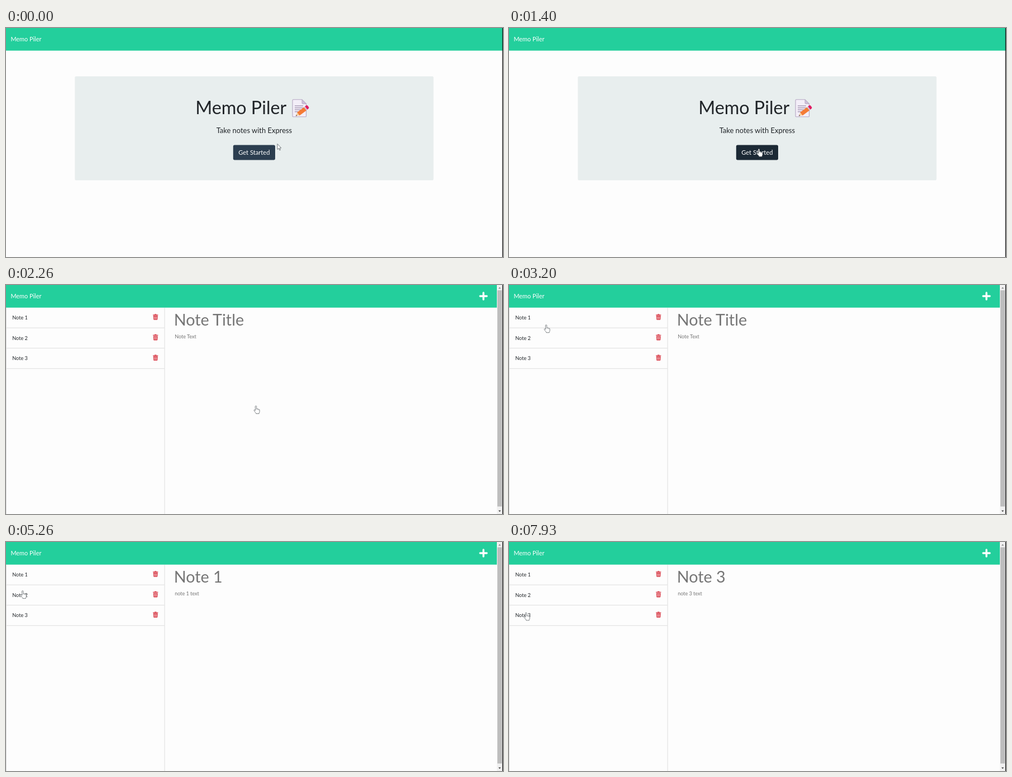
An HTML page that plays this animation: 890x412 px, repeating every 8 s.

```html
<!DOCTYPE html>
<html lang="en">
<head>
<meta charset="utf-8">
<title>Memo Piler</title>
<style>
  html, body { margin: 0; width: 100%; height: 100%; overflow: hidden; background: #fdfdfd; }
  svg { display: block; width: 100vw; height: 100vh; }
  text { font-family: Lato, sans-serif; }
</style>
</head>
<body>
<svg viewBox="0 0 890 412">
  <defs>
    <g id="trash" fill="#d93f4b">
      <path d="M-4.6-4.3h2.5l.7-1h2.8l.7 1h2.5v1.3h-9.2z"/>
      <path fill-rule="evenodd" d="M-4-2.4h8l-.4 6.7q-.1 1-1.1 1h-5q-1 0-1.1-1zM-2.3-1v5h.7v-5zM-.35-1v5h.7v-5zM1.6-1v5h.7v-5z"/>
    </g>
  </defs>

  <rect width="890" height="412" fill="#fdfdfd"/>
  <rect id="bar" width="889" height="40.7" fill="#23cf9c"/>
  <text x="8.4" y="24" font-size="10.9" fill="#fff">Memo Piler</text>

  <g id="home">
    <rect x="123.3" y="87" width="642.3" height="187" rx="2.3" fill="#e8eeee"/>
    <g fill="#212529">
      <text x="339.2" y="155.4" font-size="32.3">Memo Piler</text>
      <text x="444.4" y="188.6" font-size="12.95" text-anchor="middle">Take notes with Express</text>
    </g>
    <g id="memo">
      <path d="M514.5 128.8h15.5l7.6 7.6v22q0 1.4-1.4 1.4h-21.7q-1.4 0-1.4-1.4v-28.2q0-1.4 1.4-1.4z" fill="#f3eef8" stroke="#b5a7c2" stroke-width="1.1"/>
      <path d="M530 128.8v6.2q0 1.4 1.4 1.4h6.2z" fill="#cdbfda" stroke="#b5a7c2" stroke-width=".8"/>
      <path d="M517 140.2h15M517 143.7h15M517 147.2h11M517 150.7h7" stroke="#9b8ca9" stroke-width="1.2"/>
      <path d="M519 158.4l2.4-6.6 4.1 5.2z" fill="#f7cf9d"/>
      <path d="M519 158.4l.9-2.4 1.4 1.7z" fill="#453b4c"/>
      <path d="M521.4 151.8l12.2-9.4 4.5 5.8-12.4 9.2z" fill="#f47b35"/>
      <path d="M533.6 142.4l1.7-1.3 4.5 5.8-1.7 1.3z" fill="#cfc2d7"/>
      <path d="M535.3 141.1l2.4-1.8q1.4-.9 2.5.4l1.9 2.5q1 1.4-.2 2.5l-2.2 2.1z" fill="#e01c62"/>
    </g>
    <rect id="focus" x="405.9" y="209.5" width="77" height="28.8" rx="3.5" fill="#94a0a8"/>
    <rect id="button" x="406.8" y="210.4" width="75.2" height="27" rx="2.6"/>
    <text x="444.3" y="227.8" font-size="11.15" text-anchor="middle" fill="#fff">Get Started</text>
  </g>

  <g id="notes">
    <path d="M855 14v12M849 20h12" stroke="#fff" stroke-width="3.3" stroke-linecap="round"/>
    <path d="M.5 41v371M284 41v371" stroke="#dedede"/>
    <g id="list"></g>
    <g fill="#757575">
      <text id="title" x="300.8" y="73.4" font-size="28.7"></text>
      <text id="body" x="302.3" y="95.6" font-size="9"></text>
    </g>
    <rect x="879" width="10" height="412" fill="#f1f1f1"/>
    <rect x="880" y="9.5" width="8" height="389" fill="#bebebe"/>
    <path d="M881.8 6.4l2.2-2.6 2.2 2.6z" fill="#888"/>
    <path d="M881.8 405.6l2.2 2.6 2.2-2.6z" fill="#444"/>
  </g>

  <rect x="888.8" width="1.2" height="412" fill="#111"/>
  <circle id="ring" fill="none" stroke="#d9747d" stroke-width="2"/>
  <g id="cursor" stroke-linejoin="round">
    <path id="arrow" d="M0 0v10l2.4-2.1 1.6 3.6 1.5-.7-1.6-3.4h3z" fill="#fff" stroke="#555b60" stroke-width=".8"/>
    <g id="hand">
      <path d="M-.7 1.3q0-1.3 1.2-1.3t1.2 1.3v3.8q1.7-.4 2 .5 1.4-.3 1.8.6 1.6-.2 1.6 1.3v2.6q0 1.5-1 2.7v1.2h-5.4v-1q-1.7-1.6-3.4-4.5-.6-1.2.3-1.5.8-.3 2 1.3z" fill="#fff" stroke="#4d5358" stroke-width=".7"/>
      <path d="M1.7 5v2.2M3.7 5.8v1.8M5.5 6.5v1.4" stroke="#70767a" stroke-width=".5"/>
    </g>
  </g>
</svg>
<script>
const LOOP = 8000, PAGE_AT = 2250;
const $ = id => document.getElementById(id);
const show = (id, on) => $(id).setAttribute('visibility', on ? 'visible' : 'hidden');
const clamp = v => Math.max(0, Math.min(1, v));
const smooth = v => v * v * (3 - 2 * v);

// Pointer stops: time, x, y
const stops = [
  [60, 486, 208.5], [530, 462.5, 211.5], [1000, 447, 217.5], [2300, 447, 217.5],
  [2730, 150, 105], [3450, 34, 59], [4800, 34, 59],
  [5450, 28, 95], [6700, 28, 95], [7250, 30, 127]
];
const clicks = [1960, 4090, 5850, 7450];
const RING_TIME = 190;
const openDelay = 170;

$('list').innerHTML = [1, 2, 3].map(n => {
  const y = 40.7 + 36.6 * (n - 1);
  return `<path d="M0 ${y + 36.4}H284" stroke="#dedede"/>
    <text x="11.3" y="${y + 21.2}" font-size="9.1" fill="#212529">Note ${n}</text>
    <use href="#trash" x="267.7" y="${y + 16.8}"/>`;
}).join('');

function pointer(t) {
  const i = stops.findIndex(s => s[0] > t);
  if (i === 0) return stops[0].slice(1);
  if (i < 0) return stops[stops.length - 1].slice(1);
  const [a, b] = [stops[i - 1], stops[i]];
  const k = smooth((t - a[0]) / (b[0] - a[0]));
  return [a[1] + (b[1] - a[1]) * k, a[2] + (b[2] - a[2]) * k];
}

function mix(a, b, k) {
  return `rgb(${a.map((v, i) => Math.round(v + (b[i] - v) * k))})`;
}

function drawRing(t) {
  const start = clicks.find(c => t >= c && t < c + RING_TIME);
  show('ring', start !== undefined);
  if (start === undefined) return;
  const [x, y] = pointer(start);
  const k = (t - start) / RING_TIME;
  $('ring').setAttribute('cx', x - .5);
  $('ring').setAttribute('cy', y + .5);
  $('ring').setAttribute('r', 10 + 10 * (1 - (1 - k) ** 3));
}

function render(t) {
  const home = t < PAGE_AT;
  const [x, y] = pointer(t);
  show('home', home);
  show('notes', !home);
  show('focus', home && t >= clicks[0]);
  $('bar').setAttribute('width', home ? 889 : 879);
  $('button').setAttribute('fill', mix([44, 62, 80], [28, 41, 53], clamp((t - 200) / 150)));

  const open = clicks.slice(1).filter(c => t >= c + openDelay).length;
  $('title').textContent = open ? `Note ${open}` : 'Note Title';
  $('body').textContent = open ? `note ${open} text` : 'Note Text';

  const overButton = home && x < 482 && y > 210;
  const overList = !home && x < 284 && y < 150;
  const hand = overButton || overList || (!home && t < 2320);
  show('hand', hand);
  show('arrow', !hand);
  $('cursor').setAttribute('transform', `translate(${x} ${y})`);
  drawRing(t);
}

function tick() {
  render(performance.now() % LOOP);
  requestAnimationFrame(tick);
}
tick();
</script>
</body>
</html>
```
